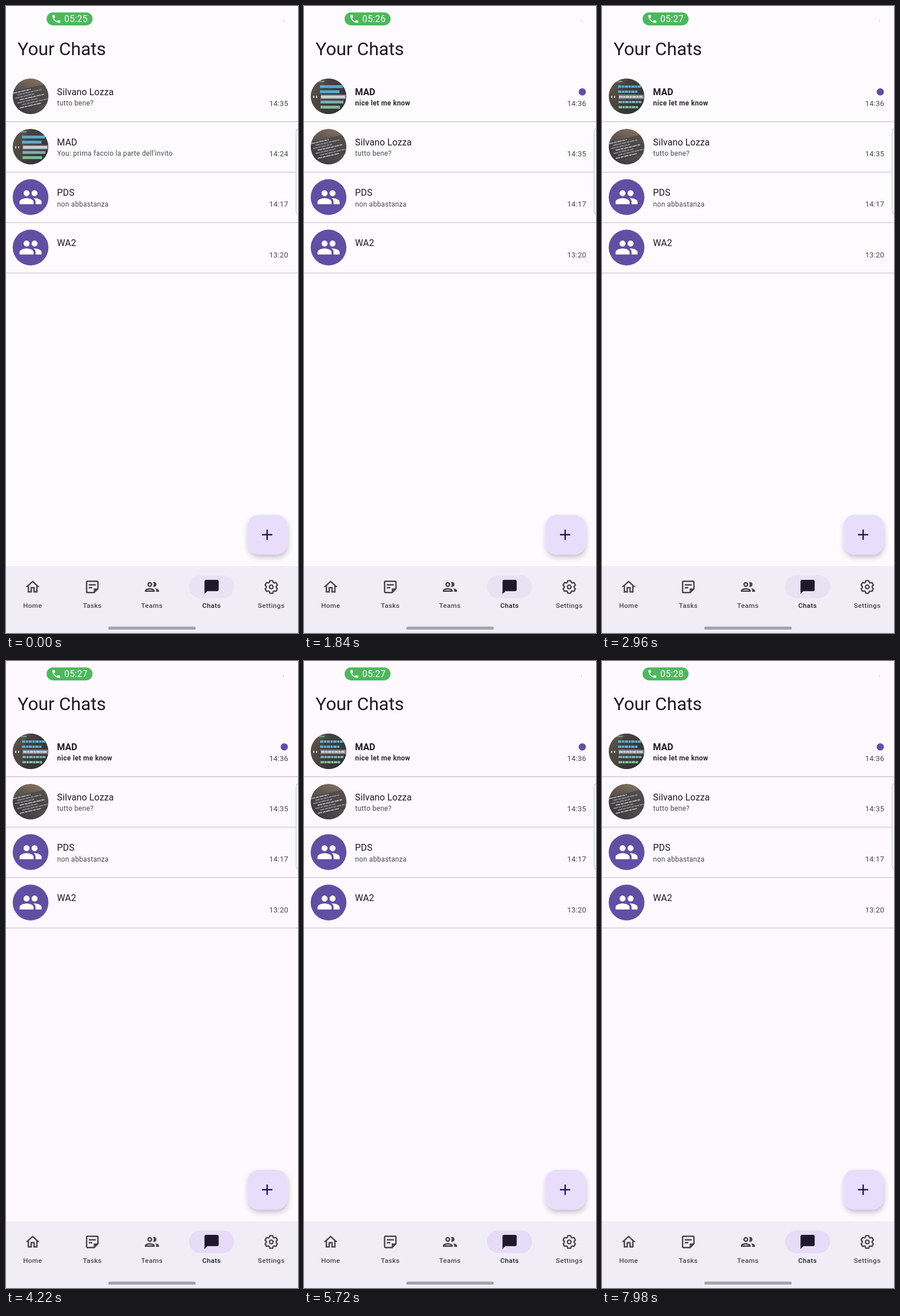
Write an HTML page that moves like this. It is 511 by 1097 pixels and loops after 8 s.

```html
<!DOCTYPE html>
<html lang="it">
<head>
<meta charset="utf-8">
<title>Chats</title>
<style>
  html, body { margin: 0; width: 100%; height: 100%; overflow: hidden; background: #fdfaff; }
  svg { display: block; width: 100vw; height: 100vh; font-family: Roboto, Inter, sans-serif; }
  .heading { font-size: 31.8px; fill: #1d1b20; }
  .name { font-size: 16px; letter-spacing: .12px; fill: #1d1b20; }
  .last { font-size: 12px; letter-spacing: .34px; fill: #49454f; }
  .time { font-size: 13px; letter-spacing: .2px; fill: #49454f; text-anchor: end; }
  .unread .name { font-weight: 700; letter-spacing: 0; }
  .unread .last { font-weight: 700; letter-spacing: .34px; fill: #2b2830; }
  .call { font-size: 15.8px; letter-spacing: .3px; fill: #fff; }
  .tab { font-size: 11.8px; font-weight: 500; letter-spacing: .4px; fill: #49454f; text-anchor: middle; }
  .tab.on { fill: #1d1b20; }
</style>
</head>
<body>
<svg id="stage" viewBox="0 0 511 1097" preserveAspectRatio="none">
  <defs>
    <clipPath id="round"><circle r="31.3"/></clipPath>
    <linearGradient id="desk" x1=".8" y1="0" x2=".3" y2="1">
      <stop offset="0" stop-color="#85735f"/>
      <stop offset=".4" stop-color="#625853"/>
      <stop offset="1" stop-color="#3c3a40"/>
    </linearGradient>
    <linearGradient id="screen" x1="0" y1="0" x2="1" y2=".8">
      <stop offset="0" stop-color="#79695a"/>
      <stop offset=".35" stop-color="#46413f"/>
      <stop offset="1" stop-color="#303137"/>
    </linearGradient>
    <filter id="lift" x="-30%" y="-30%" width="160%" height="170%">
      <feDropShadow dx="1" dy="5" stdDeviation="4" flood-color="#3a3148" flood-opacity=".28"/>
    </filter>
    <filter id="soft" x="-20%" y="-20%" width="140%" height="140%"><feGaussianBlur stdDeviation=".6"/></filter>
  </defs>
  <rect id="page" width="511" height="1097"/>
  <rect x="71" y="11.3" width="80.5" height="22.6" rx="11.3" fill="#4cb85d"/>
  <g id="phone"></g>
  <text id="call" class="call" x="102" y="28.4"></text>
  <circle cx="485.5" cy="25.7" r=".8" fill="#98969b"/>
  <text class="heading" x="20.3" y="86">Your Chats</text>
  <g id="list"></g>
  <rect x="507.6" y="214" width="20" height="151" rx="6" fill="#fbfafb" stroke="#c3c2c5" stroke-width="1.1"/>
  <rect x="422.5" y="890.3" width="70" height="69.5" rx="19.5" fill="#e8defc" filter="url(#lift)"/>
  <path d="M448 925h18M457 916v18" stroke="#25104f" stroke-width="2.4"/>
  <rect y="980" width="511" height="117" fill="#f1edf7"/>
  <rect id="pill" x="320.3" y="996" width="79" height="40" rx="20"/>
  <g id="tabs"></g>
  <rect x="179" y="1085.8" width="153" height="5.2" rx="2.6" fill="#a5a2aa"/>
</svg>
<script>
const LOOP = 8000;
const ROW_TOP = 158, ROW_GAP = 88.2;

// Each step takes over at its time.
const STEPS = [
  { at: 0, call: '05:25' },
  { at: 820, call: '05:26' },
  { at: 1840, call: '05:26', fresh: true },
  { at: 2960, call: '05:27', fresh: true, sharp: true },
  { at: 4220, call: '05:27', fresh: true, sharp: true, tint: true },
  { at: 7160, call: '05:28', fresh: true, sharp: true, tint: true }
];

const ICON = {
  phone: 'M6.62 10.79c1.44 2.83 3.76 5.14 6.59 6.59l2.2-2.2c.27-.27.67-.36 1.02-.24 1.12.37 2.33.57 3.57.57.55 0 1 .45 1 1V20c0 .55-.45 1-1 1-9.39 0-17-7.61-17-17 0-.55.45-1 1-1h3.5c.55 0 1 .45 1 1 0 1.25.2 2.45.57 3.57.11.35.03.74-.25 1.02l-2.2 2.2z',
  group: 'M16 11a3 3 0 1 0 0-6 3 3 0 0 0 0 6zM8 11a3 3 0 1 0 0-6 3 3 0 0 0 0 6zm0 2c-2.33 0-7 1.17-7 3.5V19h14v-2.5c0-2.33-4.67-3.5-7-3.5zm8 0c-.29 0-.62.02-.97.05 1.16.84 1.97 1.97 1.97 3.45V19h6v-2.5c0-2.33-4.67-3.5-7-3.5z',
  home: 'M12 5.69l5 4.5V18h-2v-6H9v6H7v-7.81l5-4.5M12 3L2 12h3v8h6v-6h2v6h6v-8h3L12 3z',
  tasks: 'M19 5v9h-5v5H5V5h14m0-2H5c-1.1 0-2 .9-2 2v14c0 1.1.9 2 2 2h10l6-6V5c0-1.1-.9-2-2-2zm-7 11H7v-2h5v2zm5-4H7V8h10v2z',
  teams: 'M9 13.75c-2.34 0-7 1.17-7 3.5V19h14v-1.75c0-2.33-4.66-3.5-7-3.5zM4.34 17c.84-.58 2.87-1.25 4.66-1.25s3.82.67 4.66 1.25H4.34zM9 12c1.93 0 3.5-1.57 3.5-3.5S10.93 5 9 5 5.5 6.57 5.5 8.5 7.07 12 9 12zm0-5c.83 0 1.5.67 1.5 1.5S9.83 10 9 10s-1.5-.67-1.5-1.5S8.17 7 9 7zm7.04 6.81c1.16.84 1.96 1.96 1.96 3.44V19h4v-1.75c0-2.02-3.5-3.17-5.96-3.44zM15 12c1.93 0 3.5-1.57 3.5-3.5S16.93 5 15 5c-.54 0-1.04.13-1.5.35.63.89 1 1.98 1 3.15s-.37 2.26-1 3.15c.46.22.96.35 1.5.35z',
  chats: 'M20 2H4c-1.1 0-2 .9-2 2v18l4-4h14c1.1 0 2-.9 2-2V4c0-1.1-.9-2-2-2z'
};

const $ = id => document.getElementById(id);

// A 24-unit icon centred on x, y.
const place = (x, y, scale, fill, inner) =>
  `<g transform="translate(${x - 12 * scale} ${y - 12 * scale}) scale(${scale})" fill="${fill}">${inner}</g>`;
const icon = (name, x, y, scale, fill) => place(x, y, scale, fill, `<path d="${ICON[name]}"/>`);

function gear() {
  const points = [];
  for (let tooth = 0; tooth < 6; tooth++) {
    for (const [turn, radius] of [[-23, 7], [-13, 9.1], [13, 9.1], [23, 7]]) {
      const a = (tooth * 60 - 90 + turn) * Math.PI / 180;
      points.push(`${(12 + radius * Math.cos(a)).toFixed(2)},${(12 + radius * Math.sin(a)).toFixed(2)}`);
    }
  }
  return `<g fill="none" stroke="#49454f" stroke-width="1.9" stroke-linejoin="round">
    <polygon points="${points.join(' ')}"/><circle cx="12" cy="12" r="2.6"/></g>`;
}

const bar = (x, y, w, color, size, dash = '') =>
  `<path d="M${x} ${y}h${w}" stroke="${color}" stroke-width="${size}" stroke-dasharray="${dash}"/>`;

const photo = (fill, inner) =>
  `<g clip-path="url(#round)"><circle r="31.3" fill="url(#${fill})"/><g filter="url(#soft)">${inner}</g></g>`;

const AVATAR = {
  group: () => '<circle r="31.3" fill="#614fa3"/>' + icon('group', 0, 0, 1.75, '#fff'),
  slant: () => {
    let lines = '';
    for (let i = 0; i < 7; i++) {
      const x = -29 + i * 7 % 12, w = 32 + i * 11 % 20;
      lines += bar(x, -12 + i * 4.6, w, i % 3 ? '#96979c' : '#c2bfbc', 1.7, '8 1 5 1');
    }
    return photo('desk', `<g transform="rotate(-13)">
      <path d="M-34 -15h68v34h-68z" fill="#3b3b42" opacity=".55"/>${lines}</g>`);
  },
  code: sharp => {
    const dash = sharp ? '6 .8 4 .8' : '';
    const size = sharp ? 4.2 : 5;
    return photo('screen',
      '<path d="M-32 -32h24l-7 64h-17z" fill="#5a4e45" opacity=".5"/>' +
      bar(-18, -26, 11, '#6f9a86', 2.5) +
      bar(-15, -17, 40, '#5aabca', size, dash) +
      bar(-15, -8, 34, '#5aaccb', size, dash) +
      bar(-14, 1, 46, '#777983', 8) +
      bar(-27, 1, 9, '#d3d4d6', 4, '2 3') +
      bar(-13, 1, 42, '#d0d2d6', size - .6, dash) +
      bar(-14, 10, 40, '#78b0b1', size, dash) +
      bar(-14, 19, 34, '#82bd97', size, dash));
  }
};

function row(chat, index, sharp) {
  const y = ROW_TOP + index * ROW_GAP;
  return `<g transform="translate(0 ${y})" class="${chat.unread ? 'unread' : ''}">
    <g transform="translate(43 0)">${AVATAR[chat.face](sharp)}</g>
    <text class="name" x="89.3" y="-2.3">${chat.name}</text>
    <text class="last" x="89.6" y="16.2">${chat.last}</text>
    <text class="time" x="493.9" y="17">${chat.time}</text>
    ${chat.unread ? '<circle cx="487" cy="-7.7" r="6.3" fill="#614fa3"/>' : ''}
    <path d="M0 44.5h511" stroke="#cbc8cc" stroke-width="1.3"/></g>`;
}

function chats(fresh) {
  const friend = { name: 'Silvano Lozza', last: 'tutto bene?', time: '14:35', face: 'slant' };
  const team = fresh
    ? { name: 'MAD', last: 'nice let me know', time: '14:36', face: 'code', unread: true }
    : { name: 'MAD', last: "You: prima faccio la parte dell'invito", time: '14:24', face: 'code' };
  return [
    ...(fresh ? [team, friend] : [friend, team]),
    { name: 'PDS', last: 'non abbastanza', time: '14:17', face: 'group' },
    { name: 'WA2', last: '', time: '13:20', face: 'group' }
  ];
}

$('phone').innerHTML = icon('phone', 88, 22.7, .76, '#fff');
$('tabs').innerHTML = ['Home', 'Tasks', 'Teams', 'Chats', 'Settings'].map((label, i) => {
  const x = 46.6 + i * 104.4, on = label === 'Chats';
  const art = label === 'Settings'
    ? place(x, 1016.4, 1.24, 'none', gear())
    : icon(label.toLowerCase(), x, 1016.4, 1.24, on ? '#1d192b' : '#49454f');
  return `${art}<text class="tab${on ? ' on' : ''}" x="${x}" y="1053.3">${label}</text>`;
}).join('');

function show(step) {
  $('call').textContent = step.call;
  $('list').innerHTML = chats(step.fresh).map((chat, i) => row(chat, i, step.sharp)).join('');
  $('page').setAttribute('fill', step.tint ? '#fdf9ff' : '#fdfbfe');
  $('pill').setAttribute('fill', step.tint ? '#e6dcf7' : '#e9e2f4');
}

let current;
const start = performance.now();
function tick() {
  const t = (performance.now() - start) % LOOP;
  const step = STEPS.filter(s => s.at <= t).pop();
  if (step !== current) show(current = step);
  requestAnimationFrame(tick);
}
tick();
</script>
</body>
</html>
```
